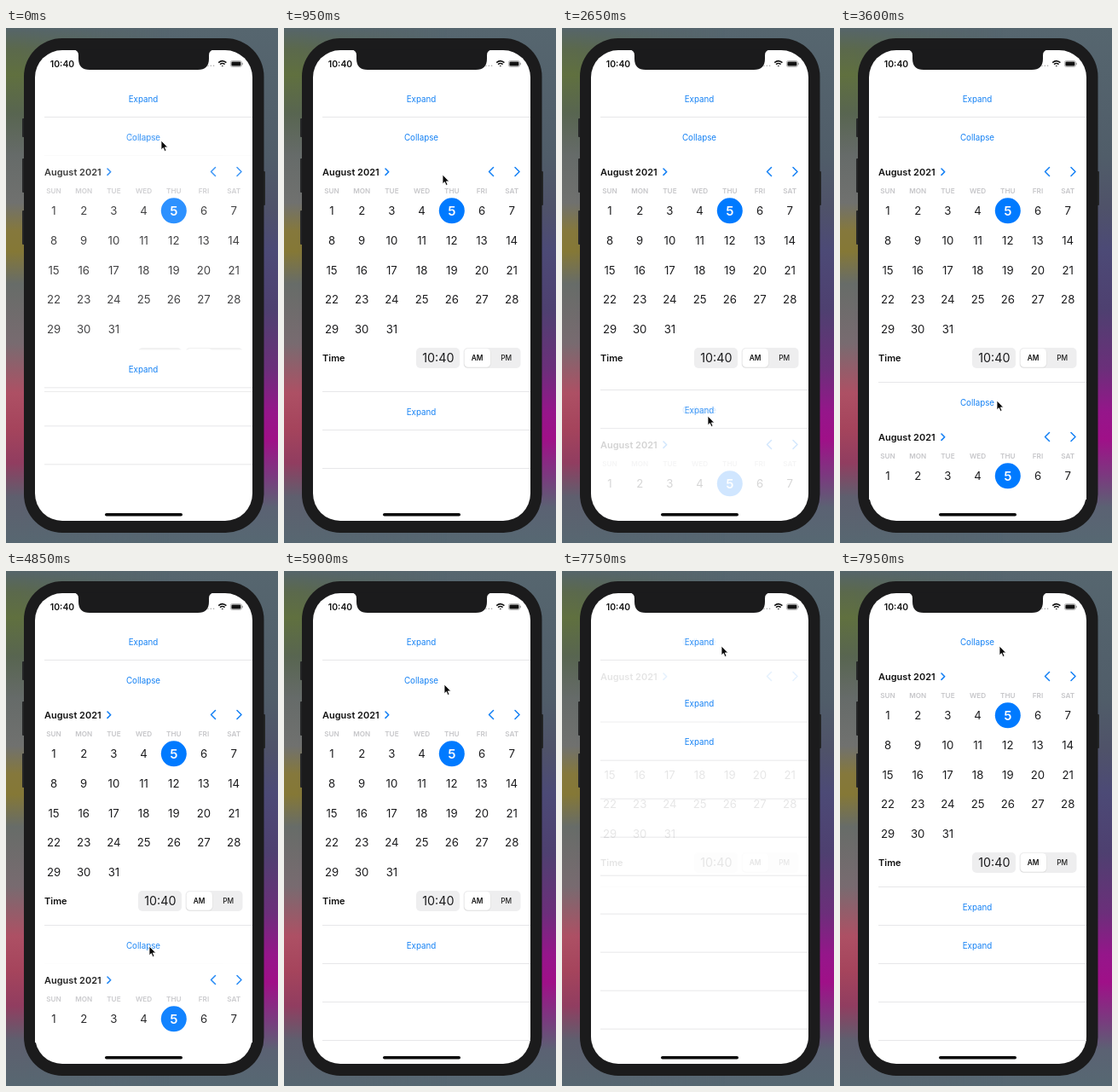
Recreate the animation shown at these times as an HTML page. Size 319 by 604 pixels, loop 8 s.

```html
<!DOCTYPE html>
<html lang="en">
<head>
<meta charset="utf-8">
<title>Expanding calendar rows</title>
<style>
html, body { margin: 0; width: 100%; height: 100%; overflow: hidden; background: #56666f; }
svg { display: block; width: 319px; height: 604px; font-family: Inter, "Liberation Sans", sans-serif; }
.mid { text-anchor: middle; }
.link { font-size: 9.8px; fill: #1682f4; text-anchor: middle; }
.bold { font-weight: 600; font-size: 11px; fill: #111; }
.week { font-weight: 600; font-size: 8.2px; fill: #c6c6c9; text-anchor: middle; }
.day { font-size: 13.2px; fill: #1c1c1e; text-anchor: middle; }
.today { font-size: 15px; font-weight: 600; fill: #fff; text-anchor: middle; }
.arrow { fill: none; stroke: #1480f5; stroke-linecap: round; stroke-linejoin: round; }
.line { fill: #e7e7e9; }
</style>
</head>
<body>
<svg viewBox="0 0 319 604">
  <defs>
    <linearGradient id="left" x2="0" y2="1"></linearGradient>
    <linearGradient id="right" x2="0" y2="1"></linearGradient>
    <linearGradient id="across">
      <stop offset=".05" stop-color="#fff"/><stop offset=".6" stop-color="#000"/>
    </linearGradient>
    <mask id="fade"><rect width="319" height="604" fill="url(#across)"/></mask>
    <clipPath id="table"><rect x="34" y="50" width="255" height="503"/></clipPath>
  </defs>

  <rect width="319" height="604" fill="url(#right)"/>
  <rect width="319" height="604" fill="url(#left)" mask="url(#fade)"/>

  <g fill="#252627">
    <rect x="19" y="106" width="4" height="22" rx="1"/>
    <rect x="19" y="153" width="4" height="40" rx="1"/>
    <rect x="19" y="214" width="4" height="40" rx="1"/>
    <rect x="300" y="168" width="4" height="40" rx="1"/>
  </g>
  <rect x="21" y="12" width="281.5" height="580" rx="45" fill="#1b1b1c"/>
  <rect x="34" y="26" width="255" height="552" rx="32" fill="#fff"/>

  <g id="list" clip-path="url(#table)"></g>

  <path d="M79 25.5q6 .5 6 6.500v4q0 13 13 13h127q13 0 13-13v-4q0-6 6-6.500z" fill="#1b1b1c"/>
  <text x="66" y="45.700" class="mid" font-size="10.400" font-weight="600" fill="#111">10:40</text>
  <g fill="#aaa">
    <circle cx="237" cy="44.300" r=".8"/><circle cx="240.300" cy="44.300" r=".8"/><circle cx="243.600" cy="44.300" r=".8"/>
  </g>
  <g fill="none" stroke="#111" stroke-width="1.500">
    <path d="M249.200 40.600q4.600-3.900 9.200 0M251 42.700q2.800-2.300 5.600 0"/>
    <path d="M252.500 43.900h2.600l-1.300 1.400z" fill="#111" stroke="none"/>
  </g>
  <rect x="263.400" y="38.500" width="13" height="7" rx="2" fill="none" stroke="#999" stroke-width=".7"/>
  <rect x="264.400" y="39.500" width="11" height="5" rx="1.200" fill="#111"/>
  <path d="M277.300 40.800v2.400" stroke="#999"/>
  <rect x="116" y="569" width="91" height="3.600" rx="1.800" fill="#080808"/>

  <path id="cursor" d="M0 0v10.800l2.400-2.200 1.700 3.900 1.900-.8-1.700-3.800h3.400z" fill="#080808" stroke="#fff" stroke-width=".8"/>
</svg>
<script>
const LOOP = 8000, STEP = 50, TOP = 60, ROW = 45;
const $ = id => document.getElementById(id);

function fillGradient(id, stops) {
  $(id).innerHTML = stops.split(' ').map(s => {
    const [y, color] = s.split('#');
    return `<stop offset="${y / 604}" stop-color="#${color}"/>`;
  }).join('');
}
fillGradient('left', '0#56656a 25#5b694c 55#60703f 100#586550 150#666b69 205#70716f 238#85783c 262#857836 300#676c68 370#786b70 428#ad5064 470#a5445c 510#913d60 550#5e5f6e 604#576771');
fillGradient('right', '0#56666f 150#505d69 210#4f5269 260#4c4a76 330#4e4070 400#6b2f7a 450#95168a 482#9f1088 525#7b397f 562#5b6273 604#566872');

const label = (x, y, cls, s, extra = '') => `<text x="${x}" y="${y}" class="${cls}" ${extra}>${s}</text>`;
const line = y => `<rect class="line" x="45" y="${y - 1}" width="244" height="1"/>`;
const arrow = (d, w) => `<path class="arrow" d="${d}" stroke-width="${w}"/>`;

// Positions are relative to the top of the row.
function calendar() {
  const column = i => 56 + 35.2 * i;
  let s = label(45, 67.5, 'bold', 'August 2021');
  s += arrow('M119 60l3.700 3.700-3.700 3.700', 1.6);
  s += arrow('M245.500 58.500l-5 5 5 5M271 58.500l5 5-5 5', 1.5);
  'SUN MON TUE WED THU FRI SAT'.split(' ').forEach((d, i) => s += label(column(i), 89, 'week', d));
  s += `<circle cx="${column(4)}" cy="109.300" r="15" fill="#007aff"/>`;
  for (let d = 1; d <= 31; d++) {
    const x = column((d - 1) % 7), y = 114 + 34.8 * Math.floor((d - 1) / 7);
    s += label(x, d === 5 ? y + .6 : y, d === 5 ? 'today' : 'day', d);
  }
  s += label(45, 285.8, 'bold', 'Time');
  s += `<rect x="155" y="270" width="51" height="24" rx="5" fill="#eeeeef"/>`;
  s += label(180.8, 287, 'day', '10:40', 'style="font-size:14.3px"');
  s += `<rect x="210.500" y="270" width="67" height="24" rx="5" fill="#eeeeef"/>
    <rect x="211" y="271.500" width="31.500" height="22" rx="4.500" fill="#ddd"/>
    <rect x="211.500" y="271" width="30.500" height="21.700" rx="4.500" fill="#fff"/>`;
  s += label(226.6, 285, 'mid', 'AM', 'font-size="8.3" font-weight="600" fill="#111"');
  s += label(260.7, 285, 'mid', 'PM', 'font-size="8.3" font-weight="500" fill="#222"');
  return s;
}

const fillers = Array.from({length: 10}, (_, i) => line(ROW * (i + 1))).join('');
const rowMarkup = `<g class="row"><rect class="back" x="34" width="255" fill="#fff"/>
  <g class="closed">${label(161, 26.5, 'link', 'Expand')}${line(ROW)}</g>
  <g class="open">${label(161, 26.5, 'link', 'Collapse')}${calendar()}<g class="end">${line(0)}</g></g></g>`;
$('list').innerHTML = `<g id="fillers">${fillers}</g>` + rowMarkup.repeat(3);

const rows = [...document.querySelectorAll('.row')].map(el => {
  const part = name => el.querySelector('.' + name);
  return {el, back: part('back'), closed: part('closed'), open: part('open'), end: part('end')};
});

const smooth = u => { u = Math.min(1, Math.max(0, u)); return u * u * (3 - 2 * u); };
const ease = (t, start, length = 300) => smooth((t - start) / length);
const move = (el, x, y) => el.setAttribute('transform', `translate(${x} ${y})`);

// time, x, y of the pointer tip
const path = [
  [0, 182, 132], [900, 182, 132], [950, 186, 172], [1600, 171, 455], [3250, 171, 455],
  [3600, 184, 437], [4050, 184, 437], [4300, 168, 440], [4850, 168, 440], [5100, 158, 409],
  [5450, 158, 409], [5650, 154, 192], [5750, 154, 192], [5900, 188, 133], [6050, 190, 133],
  [6850, 190, 133], [7300, 187, 88], [LOOP, 187, 88]
];

function pointer(t) {
  const i = path.findIndex(p => p[0] > t);
  const [t0, x0, y0] = path[i - 1], [t1, x1, y1] = path[i];
  const k = smooth((t - t0) / (t1 - t0));
  return [x0 + (x1 - x0) * k, y0 + (y1 - y0) * k];
}

function draw(t) {
  const opened = [
    ease(t, 7700, 250),
    ease(t, -219) - ease(t, 6539),
    ease(t, 2569) - ease(t, 4800)
  ];
  const full = [311, 322 - 11 * ease(t, 2569), 311];
  let y = TOP;
  rows.forEach((row, i) => {
    const p = opened[i], height = ROW + p * (full[i] - ROW);
    move(row.el, 0, y);
    row.back.setAttribute('height', height);
    row.closed.setAttribute('opacity', 1 - p);
    row.open.setAttribute('opacity', p);
    move(row.end, 0, full[i]);
    y += height;
  });
  move($('fillers'), 0, y);
  move($('cursor'), ...pointer(t));
}

const begin = performance.now();
function tick() {
  const t = (performance.now() - begin) % LOOP;
  draw(t - t % STEP);
  requestAnimationFrame(tick);
}
tick();
</script>
</body>
</html>
```
